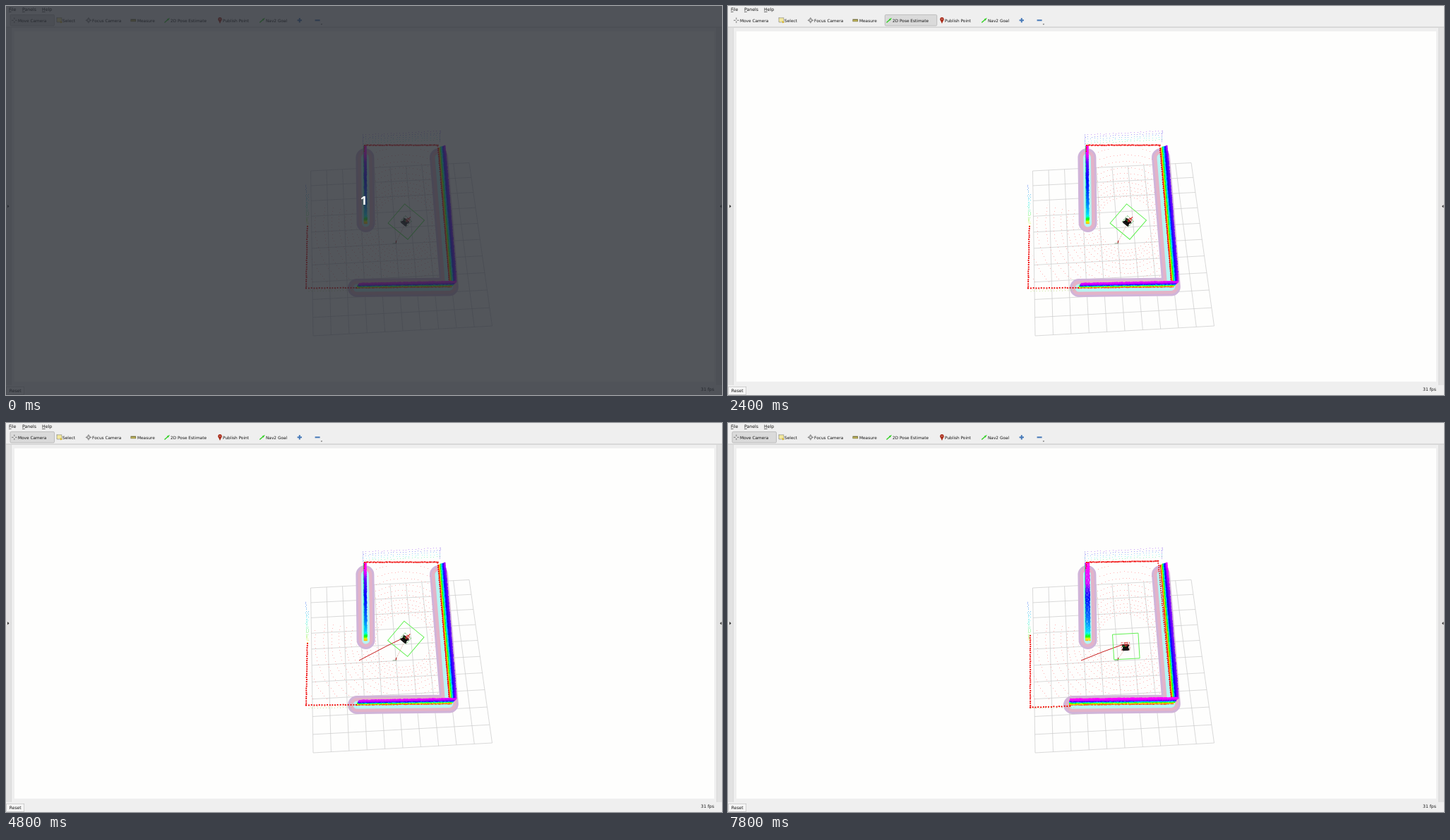
These frames come from a looping animation (1014x552 px, 8000 ms). An HTML page with a canvas:

```html
<!DOCTYPE html>
<html lang="en">
<head>
<meta charset="utf-8">
<title>Robot navigation view</title>
<style>
html, body { margin: 0; width: 100%; height: 100%; overflow: hidden; background: #efefef; }
canvas { display: block; }
</style>
</head>
<body>
<canvas id="stage" width="1014" height="552"></canvas>
<script>
const g = document.getElementById('stage').getContext('2d');
const LOOP = 8000, STEP = 200;
const INK = '#151515', BAR = '#efefef', RED = '#f00000';

let seed;
const rnd = () => (seed = (seed * 16807) % 2147483647) / 2147483647;
const mix = (a, b, u) => a + (b - a) * u;

// Piecewise linear value from [position, value] pairs.
function ramp(x, keys) {
  if (x <= keys[0][0]) return keys[0][1];
  for (let i = 1; i < keys.length; i++) {
    const [a, p] = keys[i - 1], [b, q] = keys[i];
    if (x < b) return mix(p, q, (x - a) / (b - a));
  }
  return keys[keys.length - 1][1];
}

function box(x, y, w, h, color) {
  g.fillStyle = color;
  g.fillRect(x, y, w, h);
}

function dot(x, y, size, color) {
  box(x - size / 2, y - size / 2, size, size, color);
}

// One crisp pixel.
function speck(x, y, color) {
  box(Math.floor(x), Math.floor(y), 1, 1, color);
}

function trace(pts, close) {
  g.beginPath();
  pts.forEach(([x, y]) => g.lineTo(x, y));
  if (close) g.closePath();
}

function line(pts, color, width, close) {
  trace(pts, close);
  g.strokeStyle = color;
  g.lineWidth = width;
  g.stroke();
}

function shape(pts, color) {
  trace(pts, true);
  g.fillStyle = color;
  g.fill();
}

function label(str, x, y, size) {
  g.font = size + 'px "DejaVu Sans", sans-serif';
  g.fillStyle = INK;
  g.fillText(str, x, y);
}

function dots([x1, y1], [x2, y2], gap, size, color, wobble = 0.6) {
  const n = Math.round(Math.hypot(x2 - x1, y2 - y1) / gap);
  for (let i = 0; i <= n; i++) {
    const u = i / n, j = () => (rnd() - 0.5) * wobble;
    dot(mix(x1, x2, u) + j(), mix(y1, y2, u) + j(), size, color);
  }
}

// ---- window ----
function greenArrow(x) {
  line([[x, 23.5], [x + 4.5, 19.5]], '#2ed020', 1.4);
  shape([[x + 7.5, 16.8], [x + 5.3, 20.8], [x + 3.3, 18.8]], '#2ed020');
}

function cross(x, y, r, color, width) {
  line([[x - r, y], [x + r, y]], color, width);
  line([[x, y - r], [x, y + r]], color, width);
}

function chrome(tool) {
  box(0, 0, 1014, 552, BAR);
  box(0, 29.6, 1014, 0.9, '#bdbdbd');
  box(0, 31, 7.5, 507, '#e2e2e2');
  box(1006.5, 31, 7.5, 507, '#e2e2e2');
  box(7, 31, 0.6, 507, '#cfcfcf');
  box(1006.5, 31, 0.6, 507, '#cfcfcf');
  box(12, 36, 991, 497, '#fefefd');
  shape([[2, 282], [4.5, 284.2], [2, 286.4]], '#333');
  shape([[1013.4, 282], [1011, 284.2], [1013.4, 286.4]], '#333');

  [['File', 4, 3.5], ['Panels', 23, 3.7], ['Help', 51, 4.6]].forEach(([s, x, w]) => {
    label(s, x, 6.9, 6.2);
    box(x, 7.9, w, 0.6, INK);
  });

  const [bx, bw] = { move: [6, 62.5], pose: [222.3, 73.5], goal: [357, 52] }[tool];
  g.beginPath();
  g.roundRect(bx, 12.4, bw, 15.6, 1.5);
  g.fillStyle = '#dadada';
  g.fill();
  g.strokeStyle = '#acacac';
  g.lineWidth = 0.7;
  g.stroke();

  [['Move Camera', 17], ['Select', 80], ['Focus Camera', 122], ['Measure', 186],
   ['2D Pose Estimate', 233], ['Publish Point', 307], ['Nav2 Goal', 368]]
    .forEach(([s, x]) => label(s, x, 22.7, 5.82));

  cross(11.8, 20.3, 3.8, '#777', 1);
  dot(11.8, 20.3, 2.2, '#efefef');
  box(72, 16.8, 7, 6, '#f3e9a0');
  g.setLineDash([1.3, 0.8]);
  line([[72, 16.8], [79, 16.8], [79, 23], [72, 23]], '#555', 0.7, true);
  g.setLineDash([]);
  shape([[76.5, 21], [80, 23], [77.5, 24.6]], '#d8b520');
  cross(116.9, 20.3, 4.2, '#777', 0.9);
  g.beginPath();
  g.arc(116.9, 20.3, 2.4, 0, 7);
  g.stroke();
  dot(116.9, 20.3, 1.6, '#efefef');
  box(176.5, 18.6, 7.6, 3.6, '#6f6a35');
  box(177.1, 19.9, 6.4, 1.7, '#c9bd62');
  greenArrow(224.5);
  greenArrow(359.3);
  shape([[300.5, 19.5], [303, 25], [305.5, 19.5]], '#a92a18');
  g.beginPath();
  g.arc(303, 18.7, 2.7, 0, 7);
  g.fill();
  dot(303, 18.6, 1.5, '#d9a59a');
  cross(415.8, 20.3, 3.2, '#4679b8', 2);
  box(437.6, 19.3, 7, 2, '#4679b8');
  shape([[445.6, 25.4], [448.2, 25.4], [446.9, 26.8]], '#333');

  box(0.4, 540, 25.6, 11.6, '#b9b9b9');
  box(1, 540.6, 24.4, 10.4, '#f6f6f6');
  label('Reset', 4.7, 547.7, 6.1);
  label('31 fps', 984, 545.6, 6.1);
}

// ---- ground ----
function grid() {
  const [[ax, ay], [bx, by], [cx, cy], [dx, dy]] =
    [[431.5, 234], [656, 222.5], [688.5, 454], [435, 468]];
  const ex = bx - cx, ey = by - cy, fx = dx - cx, fy = dy - cy;
  const sx = ax - bx + cx - dx, sy = ay - by + cy - dy, det = ex * fy - fx * ey;
  const p = (sx * fy - fx * sy) / det, q = (ex * sy - sx * ey) / det;
  const at = (u, v) => {
    const w = 1 + p * u + q * v;
    return [(ax + (bx - ax + p * bx) * u + (dx - ax + q * dx) * v) / w,
            (ay + (by - ay + p * by) * u + (dy - ay + q * dy) * v) / w];
  };
  for (let i = 0; i <= 10; i++) {
    const k = i / 10;
    line([at(0, k), at(1, k)], '#cdcdcd', 0.75);
    line([at(k, 0), at(k, 1)], '#cdcdcd', 0.75);
  }
}

function inflation(end) {
  g.lineCap = g.lineJoin = 'round';
  [['#d0b4d9', 26], ['#e3b3c8', 20], ['#b4f5f4', 11]].forEach(([color, width]) => {
    line([[508.4, 215], [509.6, 308]], color, width);
    line([[613, 215], [627.8, 398.5], [end, 400]], color, width);
  });
  g.lineCap = 'butt';
  g.lineJoin = 'miter';
}

function cloud() {
  g.save();
  trace([[523, 203], [600, 203], [612, 384], [500, 386], [432, 396], [431, 300],
         [448, 282], [495, 290], [497, 322], [523, 322]], true);
  g.clip();
  for (let r = 40; r < 160; r *= 1.11)
    for (let a = 0; a < 6.28; a += 5 / r)
      speck(563 + r * Math.cos(a) + rnd(), 308 + r * 0.95 * Math.sin(a) + rnd(),
            'rgba(255,120,120,.55)');
  g.restore();

  for (let i = 0; i < 26; i++) {
    const x = 505 + i * 4.35, top = 182.5 - i * 0.22;
    for (let k = 0; k < 5; k++)
      speck(x + rnd() * 1.5, top + k * 3 + rnd(), `hsl(${268 - k * 30} 85% 72% / .75)`);
  }
  for (let k = 0; k < 8; k++) {
    speck(505 + rnd(), 182 + k * 2, '#a9a4f0');
    speck(614.5 + rnd(), 177 + k * 2.2, '#b09cf0');
  }
  for (let y = 254; y < 312; y += 2.2) {
    const color = `hsl(${ramp(y, [[254, 225], [285, 170], [311, 60]])} 85% 70%)`;
    speck(424 + (y - 254) * 0.03 + rnd(), y, color);
    if (y > 266) speck(426.5 + rnd() * 2, y, color);
  }
  dots([429, 405], [490, 403.5], 4, 0.9, '#b5dd80');
  dots([431, 402.5], [492, 401.5], 5, 0.9, '#e8d070');
}

// ---- walls ----
// Band of points rising from the floor line a-b to the top line c-d.
function wall(a, b, c, d, rows, hue) {
  const n = Math.round(Math.hypot(b[0] - a[0], b[1] - a[1]) / 1.4);
  for (let k = 0; k <= rows; k++) {
    const v = k / rows;
    for (let i = 0; i <= n; i++) {
      const u = i / n;
      const x = mix(mix(a[0], b[0], u), mix(c[0], d[0], u), v);
      const y = mix(mix(a[1], b[1], u), mix(c[1], d[1], u), v);
      dot(x + rnd() * 0.8 - 0.4, y + rnd() * 0.8 - 0.4, 2.1, `hsl(${hue(u, v)} 100% 50%)`);
    }
  }
}

function walls(p) {
  const blues = 0.08 * p;
  wall([613, 202], [628.5, 391], [621.6, 199], [637.4, 390], 9, (u, v) => {
    const top = ramp(u, [[0, 280 + 18 * p], [0.12 + 0.1 * p, 264 + 8 * p], [0.9, 262], [1, 280]]);
    return ramp(v, [[0, 5], [0.15, 50], [0.3, 110], [0.45, 170], [0.58 - blues, 200],
                    [0.72 - blues, 238], [1, top]]);
  });

  const left = mix(497, 484, p);
  wall([left, 399.6], [630, 398], [left + 4 - 3 * p, 394 - 2 * p], [637, 391 - p], 7,
       (u, v) => ramp(v, [[0, 20], [0.15, 60], [0.3, 120], [0.42, 180], [0.55, 245],
                          [0.72, 272 + 14 * p], [1, 294 + 6 * p]]));

  const half = mix(1, 2.2, p);
  for (let y = 199; y < 309; y += 1.2) {
    const mid = 508.3 + (y - 199) * 0.009 + p * 0.4;
    dot(mid - half - 0.8, y, 1.4, `hsl(${ramp(y, [[205, 150], [300, 170], [308, 40]])} 95% 50%)`);
    const hue = ramp(y, [[205, 300], [214 + 14 * p, 292], [222 + 14 * p, 264],
                         [248, 240], [280, 212], [297, 188], [303, 120], [308, 45]]);
    for (let k = -1; k <= 1; k++)
      dot(mid + k * half + rnd() * 0.9 - 0.2, y, 1.9, `hsl(${hue} 100% 50%)`);
  }
}

function scan(p, late) {
  const x = mix(425, 428, late), y = mix(400.4, 403.6, late);
  const right = mix(611.5, 609.5, late);
  dots([508, 197.6], [right, mix(197.4, 196, late)], 2.3, 1.9, RED);
  dots([508, 198], [507, 206], 3, 1.5, RED);
  dots([mix(426.7, 428, p), mix(313, 302, p)], [x, y], 3, 1.9, RED);
  dots([x, y], [mix(496, 484, p), mix(399.8, 401.8, late)], 3.7, 1.9, RED);
  dots([right, 199], [627.5, 388], 3, 1.6, RED);
  dots([500, 400], [628, 398.6], 5, 1.4, '#f05010');
}

// ---- robot ----
function robot(t, p) {
  const x = ramp(t, [[4600, 566.8], [4800, 566.3], [6800, 563.5], [7800, 563.8]]);
  const y = ramp(t, [[4600, 306.1], [4800, 306.3], [6800, 312.3], [7800, 317]]);
  const turn = ramp(t, [[4600, 43.5], [4800, 43], [6800, 16], [7800, 0]]) * Math.PI / 180;

  g.setLineDash([2, 1]);
  line([[x - 2, y + 4], [552.3, 335]], '#d9a08c', 0.7);
  g.setLineDash([]);
  line([[552.3, 337], [552.6, 333]], '#b01515', 1.1);
  line([[547.5, 337], [553, 336.6]], '#7b9a7b', 0.8);

  if (t >= 4600) {
    const tip = [mix(567, 560, p), mix(303, 314, p)];
    line([[500, 337], [mix(541, 530, p), mix(315.5, 325, p)], tip], '#c81e1e', 1);
  }

  // The floor is seen slightly skewed.
  g.save();
  g.transform(1, -0.055, 0.06, 0.98, x, y);
  g.rotate(turn);
  g.strokeStyle = '#5cf04c';
  g.lineWidth = 0.95;
  g.strokeRect(-18.2, -18.2, 36.4, 36.4);
  g.translate(-0.8, 0.8);
  g.strokeStyle = p > 0 ? '#e03030' : '#38a838';
  g.lineWidth = 0.7;
  g.setLineDash([2.5, 1.2]);
  g.strokeRect(-5.8, -6.5, 11.6, 11);
  g.setLineDash([]);
  box(-4, -3.6, 8, 8.8, '#0a0a0a');
  box(-5, -3, 10, 2.4, '#181818');
  box(-5, 2.2, 10, 2.6, '#181818');
  line([[0.5, 0], [1, mix(-10, -5, p)]], '#e02020', 1.1);
  line([[0.5, -1], [-4.5, -1]], '#26b030', 0.9);
  g.beginPath();
  g.arc(1, -4, 2.4, 0, 7);
  g.strokeStyle = '#d02525';
  g.lineWidth = 0.9;
  g.stroke();
  g.restore();
}

function draw(t) {
  seed = 4217;
  const p = ramp(t, [[4800, 0], [6800, 0.7], [7800, 1]]);
  const late = ramp(t, [[6800, 0], [7800, 1]]);
  chrome(t < 1400 || t >= 4200 ? 'move' : t < 2800 ? 'pose' : 'goal');
  grid();
  inflation(mix(497, 488, late));
  cloud();
  walls(p);
  scan(p, late);
  robot(t, p);

  if (t < 200) {
    box(0, 0, 1014, 552, 'rgba(40,44,52,.8)');
    g.font = 'bold 17px "Open Sans", "Noto Sans", sans-serif';
    g.textAlign = 'center';
    g.fillStyle = '#fff';
    g.fillText('1', 506.5, 282);
    g.textAlign = 'left';
  }
}

g.textRendering = 'geometricPrecision';
const start = performance.now();
let shown = -1;
function tick() {
  const t = Math.floor(((performance.now() - start) % LOOP) / STEP) * STEP;
  if (t !== shown) draw(shown = t);
  requestAnimationFrame(tick);
}
tick();
</script>
</body>
</html>
```
